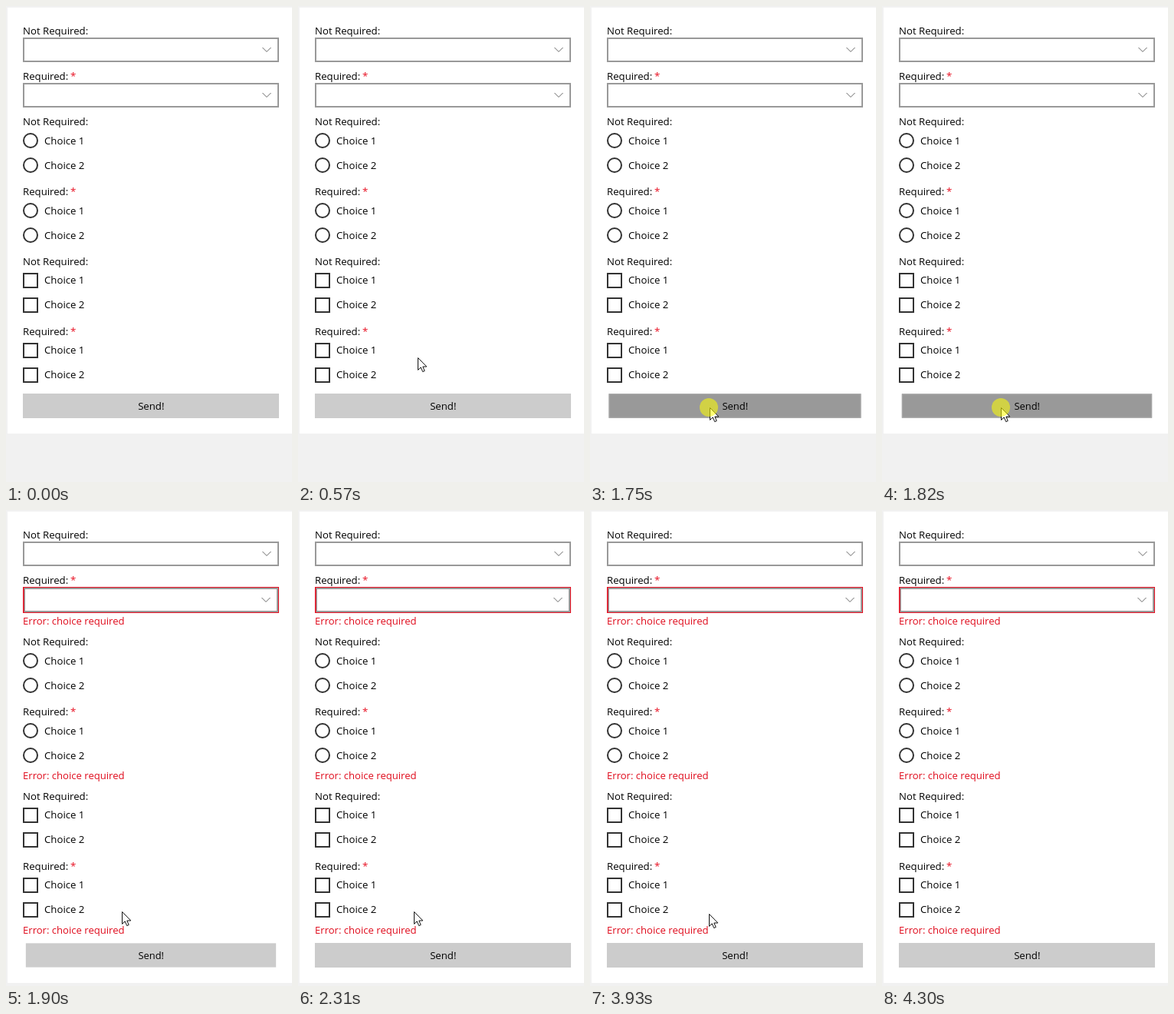
Animation of 373 by 619 pixels, one loop 5040 ms. Source, as an HTML page:

```html
<!DOCTYPE html>
<html lang="en">
<head>
<meta charset="utf-8">
<title>Form validation</title>
<style>
html, body { margin: 0; height: 100%; overflow: hidden; background: #f1f1f1; }
svg { display: block; width: 373px; height: 619px; }
text { font: 13.2px "Open Sans", "Noto Sans", sans-serif; fill: #000; }
.error { font-size: 13.1px; fill: #e00b1c; }
.star { fill: #e81123; }
.mark { fill: #fff; stroke: #333; stroke-width: 2; }
.combo { fill: #fff; stroke: #999; stroke-width: 2; }
.chevron { fill: none; stroke: #666; }
.alert { fill: none; stroke: #e81123; }
</style>
</head>
<body>
<svg viewBox="0 0 373 619">
  <g id="plain"></g>
  <g id="invalid"></g>
  <g id="button">
    <rect id="face" x="22" y="504" width="334" height="32"/>
    <rect id="hover" x="23" y="505" width="332" height="30" fill="none" stroke="#7a7a7a" stroke-width="2"/>
    <rect id="pressed" x="22.5" y="504.5" width="333" height="31" fill="none" stroke="#aaa"/>
    <text x="189.3" y="525" text-anchor="middle">Send!</text>
  </g>
  <path id="cursor" d="M.5 .5V16.4L4.2 12.9L6.7 18.6L9.2 17.5L6.8 12H11.8Z" fill="#fff" stroke="#111"/>
  <circle id="click" cx="155" cy="522" r="12" fill="#ff0" fill-opacity=".55"/>
</svg>
<script>
const LOOP = 5040, TICK = 70;
const HOVER = 1050, PRESS = 1680, RELEASE = 1890, LEAVE = 4270;
const $ = id => document.getElementById(id);
const text = (x, y, s, cls = '') => `<text x="${x}" y="${y}" class="${cls}">${s}</text>`;

const label = (y, required) => required
  ? text(22, y, 'Required:') + text(84, y, '*', 'star')
  : text(22, y, 'Not Required:');

// A failed box sits inside a thin red frame.
function combo(y, failed) {
  const inset = failed ? 1 : 0, top = y + inset;
  let s = `<rect class="combo" x="${23 + inset}" y="${top + 1}" width="${332 - 2 * inset}" height="30"/>
    <path class="chevron" d="M${334.5 - inset} ${top + 13}l5.5 5.5l5.5 -5.5"/>`;
  if (failed) s += `<rect class="alert" x="22.5" y="${y + .5}" width="333" height="33"/>
    <path class="alert" stroke-opacity=".6" d="M23.5 ${y + 1}v32"/>`;
  return s;
}

const choices = (y, round) => [0, 1].map(i => {
  const top = y + 32 * i;
  return (round
    ? `<circle class="mark" cx="32" cy="${top + 10}" r="9"/>`
    : `<rect class="mark" x="23" y="${top + 1}" width="18" height="18"/>`)
    + text(50, top + (round ? 15 : 14), `Choice ${i + 1}`);
}).join('');

// Stacks the fields; each message pushes everything below it down.
function form(invalid) {
  let s = '', y = 37;
  for (const kind of ['combo', 'radio', 'check'])
    for (const required of [false, true]) {
      const isCombo = kind == 'combo', failed = invalid && required;
      s += label(y, required);
      s += isCombo ? combo(y + 4, failed) : choices(y + 10, kind == 'radio');
      if (failed) s += text(22, y + (isCombo ? 53 : 83), 'Error: choice required', 'error');
      y += isCombo ? 59 : 91;
      if (failed) y += isCombo ? 21 : 19;
    }
  return `<rect x="2" y="2" width="371" height="${y + 35}" fill="#fff"/>` + s;
}

const ramp = (t, a, b) => Math.min(1, Math.max(0, (t - a) / (b - a)));
const ease = k => k * k * (3 - 2 * k);

// Key points of the pointer's path: time, x, y
const path = [
  [280, 223, 569], [560, 156, 457], [770, 152, 539], [980, 152, 538], [1120, 156, 522],
  [1820, 155, 522], [RELEASE, 151, 522], [2520, 151, 521], [2940, 150, 521],
  [3850, 150, 521], [LEAVE, 210, 564]
];

function pointer(t) {
  const i = path.findIndex(p => p[0] > t), [t0, ...from] = path[i - 1], [t1, ...to] = path[i];
  const k = ease(ramp(t, t0, t1));
  return from.map((v, j) => Math.ceil(v + (to[j] - v) * k));
}

const show = (id, on) => $(id).setAttribute('visibility', on ? 'visible' : 'hidden');

function draw(now) {
  const ms = now % LOOP, t = ms - ms % TICK;
  const invalid = t >= RELEASE, pressed = t >= PRESS && !invalid;
  show('plain', !invalid);
  show('invalid', invalid);
  show('hover', t >= HOVER && t < PRESS);
  show('pressed', pressed);
  show('click', pressed);

  const scale = 1 - .023 * (ramp(t, 1610, 1820) - ramp(t, 2030, 2310));
  $('button').setAttribute('transform',
    `translate(189 ${invalid ? 579 : 520}) scale(${scale}) translate(-189 -520)`);
  $('face').setAttribute('fill', pressed ? '#999' : '#ccc');

  const visible = t >= path[0][0] && t < LEAVE;
  show('cursor', visible);
  if (visible) $('cursor').setAttribute('transform', `translate(${pointer(t)})`);
  requestAnimationFrame(draw);
}

$('plain').innerHTML = form(false);
$('invalid').innerHTML = form(true);
draw(0);
</script>
</body>
</html>
```
